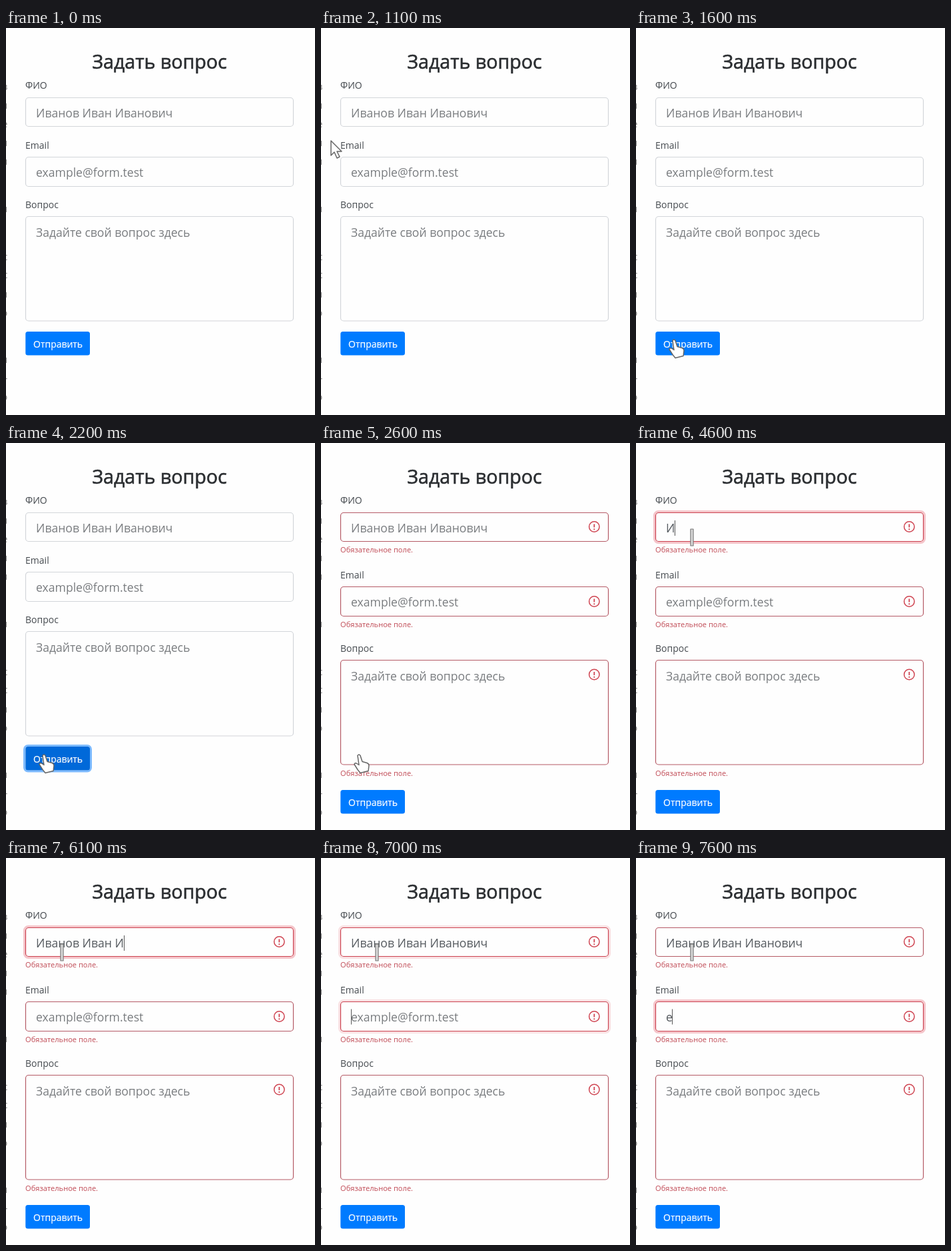
Animation, 464 px wide and 580 px high, one loop 8000 ms. Source, as an HTML page:

```html
<!DOCTYPE html>
<html lang="ru">
<head>
<meta charset="utf-8">
<style>
  html, body { margin: 0; width: 100%; height: 100%; overflow: hidden; background: #fefefe; }
  svg { display: block; font: 17.6px "Open Sans", "Noto Sans", sans-serif; }
  .title { font-size: 28.6px; font-weight: 500; fill: #2b2e31; stroke: #2b2e31; stroke-width: .6; }
  .label { font-size: 14px; fill: #454a4f; }
  .error { font-size: 11.1px; fill: #c04a55; }
  .edge { font-size: 15px; fill: #888; }
  .button { font-size: 14px; fill: #fff; stroke: #fff; stroke-width: .2; }
</style>
</head>
<body>
<svg id="stage" width="464" height="580" viewBox="0 0 464 580"></svg>
<script>
const LOOP = 8000, STEP = 100;
const NAME = 'Иванов Иван Иванович';
const stage = document.getElementById('stage');

function add(parent, tag, attrs = {}, text = '') {
  const el = document.createElementNS('http://www.w3.org/2000/svg', tag);
  set(el, attrs);
  el.textContent = text;
  return parent.appendChild(el);
}
function set(el, attrs) {
  for (const key in attrs) el.setAttribute(key, attrs[key]);
}
const show = (el, on) => set(el, { visibility: on ? 'visible' : 'hidden' });
const ramp = (t, from, to) => Math.min(1, Math.max(0, (t - from) / (to - from)));

// Clipped line ends of the neighbouring column
[[93, 'в'], [121, 'и'], [149, 'е'], [177, 'и'], [205, 'и'], [276, 'и'], [348, 'с'], [375, 'с'],
 [404, 'и'], [432, 'о'], [502, 'и'], [530, '-'], [558, 'о']].forEach(([y, letter]) =>
  add(stage, 'text', { class: 'edge', x: 2.3, y, 'text-anchor': 'end' }, letter));

add(stage, 'text', { class: 'title', x: 230.5, y: 61, 'text-anchor': 'middle' }, 'Задать вопрос');

function makeField(label, hint, labelY, top, height, textY, errorY, iconY) {
  const group = add(stage, 'g');
  add(group, 'text', { class: 'label', x: 29, y: labelY }, label);
  const glow = add(group, 'rect', { x: 27.5, y: top - 2, width: 406, height: height + 4, rx: 6,
    fill: 'none', stroke: '#dc3545', 'stroke-width': 3 });
  const box = add(group, 'rect', { x: 29.5, y: top, width: 402, height, rx: 4.5, fill: '#fefefe',
    'stroke-width': 1.2 });
  const text = add(group, 'text', { x: 45, y: textY });
  const caret = add(group, 'rect', { y: textY - 18, width: 1, height: 23, fill: '#555' });
  const error = add(group, 'g');
  add(error, 'text', { class: 'error', x: 29, y: errorY }, 'Обязательное поле.');
  add(error, 'circle', { cx: 410.3, cy: iconY, r: 7.7, fill: 'none', stroke: '#cf4552', 'stroke-width': 1.5 });
  add(error, 'path', { d: `M410.3 ${iconY - 4}v5m0 1.8v2`, stroke: '#cf4552', 'stroke-width': 1.8 });
  return { group, glow, box, text, caret, error, hint, top, height };
}
const fields = [
  makeField('ФИО', NAME, 91, 104.5, 43, 134, 164, 125.5),
  makeField('Email', 'example@form.test', 181, 193.5, 44, 222.5, 254, 215.5),
  makeField('Вопрос', 'Задайте свой вопрос здесь', 270, 282.5, 156.5, 313, 456, 304)
];

const button = add(stage, 'g');
const ring = add(button, 'rect', { x: 27.5, y: 453.5, width: 100, height: 38.5, rx: 5.5,
  fill: 'none', stroke: '#007bff', 'stroke-width': 3 });
const face = add(button, 'rect', { x: 29.3, y: 455, width: 96.7, height: 35.5, rx: 3.5 });
add(button, 'text', { class: 'button', x: 41, y: 479 }, 'Отправить');

const outline = { fill: '#fff', stroke: '#666', 'stroke-width': 1.5, 'stroke-linejoin': 'round' };
const cursors = {
  arrow: add(stage, 'path', { ...outline, d: 'M0 0v22l5-5 4 9 4-2-4-8h7z' }),
  beam: add(stage, 'path', { ...outline, fill: '#ddd', stroke: '#777', 'stroke-width': 1.2,
    d: 'M-2-13h4v25h-4z' }),
  hand: add(stage, 'path', { ...outline,
    d: 'M-2 1q2-3 4 0l3 9 7 2q3 1 3 4l-1 8-12 3-4-5-5-8q1-3 4-1l3 2z' })
};
const path = [[900, -30, 60], [1000, -4, 108], [1200, 34, 230], [1400, 66, 425], [1600, 57, 467.5],
  [2900, 57, 467.5], [3250, 100, 330], [3600, 84, 142], [LOOP, 84, 142]];

function pointer(t) {
  const i = Math.max(1, path.findIndex(p => p[0] > t));
  const [a, b] = [path[i - 1], path[i]];
  const k = ramp(t, a[0], b[0]);
  return [a[1] + (b[1] - a[1]) * k, a[2] + (b[2] - a[2]) * k];
}

function typedCount(t) {
  if (t < 4600) return 0;
  if (t < 4800) return 1;
  if (t < 4900) return 3;
  if (t < 5100) return 4;
  if (t < 6100) return 5 + Math.floor((t - 5100) / 120);
  return Math.min(NAME.length, 13 + (t - 6100) / 100);
}

function draw(t) {
  const invalid = t >= 2600;
  const shift = n => invalid ? Math.round(n * 21.7) : 0;
  const typed = [NAME.slice(0, typedCount(t)), t >= 7600 ? 'e' : '', ''];
  const leave = ramp(t, 6900, 7100);
  const focus = [ramp(t, 3700, 3800) * (1 - leave), leave, 0];
  const blinkOff = t >= 4200 && t < 4600;
  const active = t < 3700 || blinkOff ? -1 : t < 7000 ? 0 : 1;

  fields.forEach((f, i) => {
    set(f.group, { transform: `translate(0 ${shift(i)})` });
    set(f.glow, { opacity: focus[i] * .28 });
    set(f.box, { stroke: !invalid ? '#d3d6da' : focus[i] > 0 ? '#cc4250' : '#b55a66' });
    f.text.textContent = typed[i] || f.hint;
    set(f.text, { fill: typed[i] ? '#555a5f' : '#7a7d80' });
    const width = typed[i] ? f.text.getComputedTextLength() : 0;
    set(f.caret, { x: Math.round(44.6 + width) });
    show(f.caret, active === i);
    show(f.error, invalid);
  });

  const hover = invalid ? 0 : ramp(t, 1600, 1700);
  set(button, { transform: `translate(0 ${shift(3)})` });
  set(face, { fill: `rgb(0 ${123 - 18 * hover} ${255 - 38 * hover})` });
  set(ring, { opacity: invalid ? 0 : ramp(t, 1900, 2200) * .5 });

  const [x, y] = pointer(t);
  const inField = x > 29 && fields.some((f, i) => {
    const top = f.top + shift(i);
    return y > top && y < top + f.height;
  });
  const kind = t >= 1600 && t < 3000 ? 'hand' : inField ? 'beam' : 'arrow';
  for (const name in cursors) {
    show(cursors[name], name === kind && t >= 1000);
    set(cursors[name], { transform: `translate(${x} ${y})` });
  }
}

const start = performance.now();
function tick() {
  const t = (performance.now() - start) % LOOP;
  draw(Math.floor(t / STEP) * STEP);
  requestAnimationFrame(tick);
}
tick();
</script>
</body>
</html>
```
